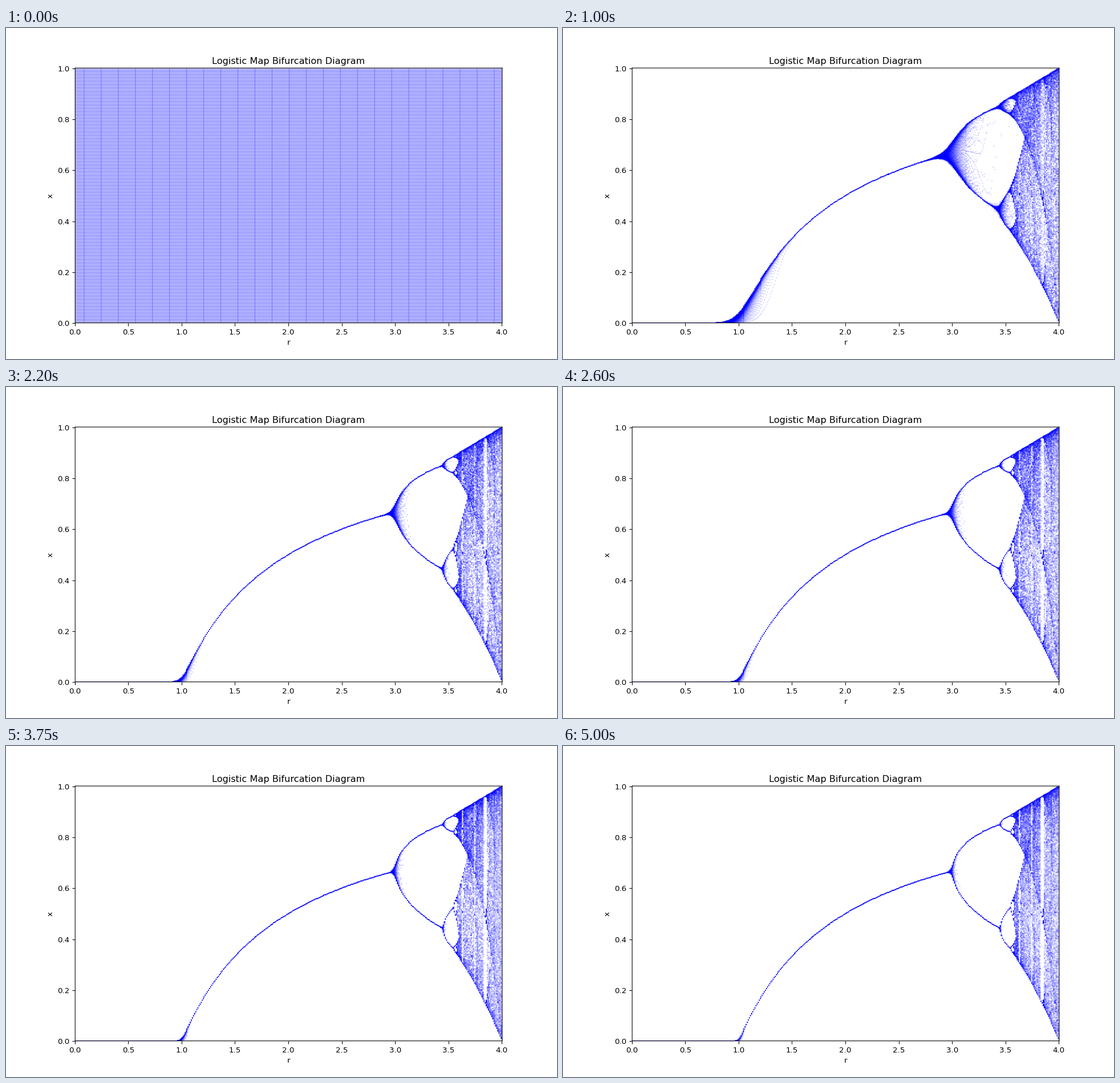
A matplotlib script for the animation above (5050 ms loop, 966 px wide and 580 px high).

```python
import numpy as np
import matplotlib.pyplot as plt
from matplotlib.animation import FuncAnimation
from matplotlib.colors import LinearSegmentedColormap
from matplotlib.transforms import ScaledTranslation

WIDTH, HEIGHT, DPI = 966, 580, 96.6
FRAMES, INTERVAL = 101, 50
COLS, ROWS = 775, 462        # raster cells across the axes

# Share of white that survives one translucent dot (edge, then fill)
KEEP = (1 - 21 / 255) * (1 - 2 / 255)

r = np.linspace(0, 4, 401)[:, None]
start = np.arange(0, 1, 0.001)[None, :]


def nearest(v):
    """Round halves up, in spite of float error."""
    return np.floor(v + 0.5 + 1e-9).astype(int)


col = nearest(r / 4 * COLS)


def paint(x):
    """Stack a translucent 2 x 2 cell dot on every (r, x) point."""
    row = nearest((1 - x) * ROWS)
    shape = ROWS + 1, COLS + 1
    hits = np.bincount((row * shape[1] + col).ravel(),
                       minlength=shape[0] * shape[1]).reshape(shape)
    pairs = hits[:-1] + hits[1:]
    white = KEEP ** (pairs[:, :-1] + pairs[:, 1:])
    return np.round(255 * white).astype(np.uint8)


def iterate():
    x = np.repeat(start, len(r), axis=0)
    for _ in range(FRAMES):
        yield paint(x)
        x = r * x * (1 - x)


layers = list(iterate())

# The small surplus keeps the canvas size from rounding down
fig, ax = plt.subplots(figsize=((WIDTH + 0.01) / DPI, (HEIGHT + 0.01) / DPI), dpi=DPI)
drop = 1 / HEIGHT
fig.subplots_adjust(left=0.125, right=0.9, bottom=0.11 - drop, top=0.88 - drop)

blues = LinearSegmentedColormap.from_list("blues", ["#0000ff", "#ffffff"])
image = ax.imshow(layers[0], cmap=blues, vmin=0, vmax=255, aspect="auto",
                  extent=(0, 4, 0, 1), interpolation="bilinear")
ax.set_xlim(0, 4)
ax.set_ylim(0, 1)
ax.set_xlabel("r")
ax.set_ylabel("x")
ax.set_title("Logistic Map Bifurcation Diagram")

# Soft frame lines, half a raster cell off the axes edge
half_cell = ScaledTranslation(0.005, 0.005, fig.dpi_scale_trans)
for spine in ax.spines.values():
    spine.set_snap(False)
    spine.set_transform(spine.get_spine_transform() + half_cell)


def update(n):
    image.set_data(layers[n])
    return [image]


anim = FuncAnimation(fig, update, frames=FRAMES, interval=INTERVAL,
                     repeat=True, repeat_delay=0)
plt.show()
```
